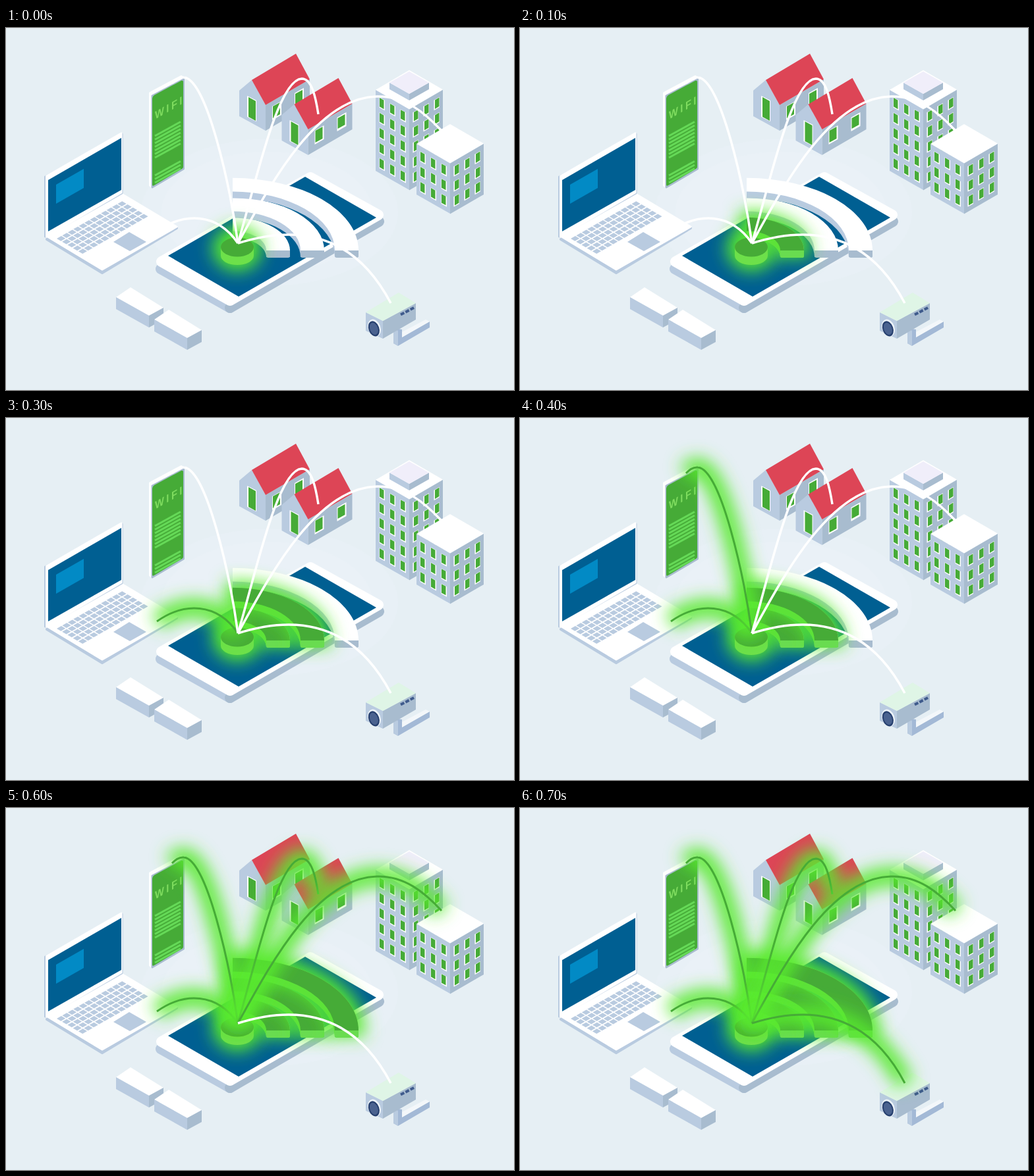
Write an HTML page that moves like this. It is 771 by 550 pixels and loops after 0.8 s.

```html
<!DOCTYPE html>
<html lang="en">
<head>
<meta charset="utf-8">
<title>Connected devices</title>
<style>
html, body { margin: 0; width: 100%; height: 100%; overflow: hidden; background: #e6eff4; }
svg { display: block; width: 771px; height: 550px; }
.w { fill: #fff; }
.l { fill: #b9cbe0; }
.r { fill: #a8bccf; }
.g { fill: #46ab37; }
.blue { fill: #005f92; }
.red { fill: #dd4556; }
.stripe { stroke: #65d957; stroke-width: 3; }
.glow { fill: #58ea2e; stroke: #58ea2e; filter: url(#blur); }
.link { fill: none; stroke: #fff; stroke-width: 3.5; }
.link.glow { stroke: #58ea2e; stroke-width: 28; }
.link.on { stroke: #46ab37; stroke-width: 3; }
text { font: bold 17px "Liberation Sans", Arial, sans-serif; letter-spacing: 4px; fill: #7fdc5f; }
</style>
</head>
<body>
<svg viewBox="0 0 771 550">
  <defs>
    <filter id="blur" filterUnits="userSpaceOnUse" x="0" y="0" width="771" height="550">
      <feGaussianBlur stdDeviation="13"/>
    </filter>
    <g id="house">
      <path class="l" d="M354 95 373 79 394 117V156L354 134Z"/>
      <path class="r" d="M394 117 461 78V117L394 156Z"/>
      <path class="red" d="M373 79 440 39 461 78 394 117Z"/>
      <path class="w" d="M366 103 380 110V142L366 135Z"/>
      <path class="g" d="M368 105 379 111V141L368 135Z"/>
      <path class="w" d="M404 119 418 111V132L404 140Z"/>
      <path class="g" d="M405 119 416 113V131L405 137Z"/>
      <path class="w" d="M438 99 452 91V112L438 120Z"/>
      <path class="g" d="M439 100 450 94V110L439 116Z"/>
    </g>
    <g id="block">
      <path class="w" d="M167 409 189 394 239 425 217 437Z"/>
      <path class="l" d="M167 409 217 437V455L167 427Z"/>
      <path class="r" d="M217 437 239 425V443L217 455Z"/>
    </g>
  </defs>

  <ellipse cx="400" cy="280" rx="195" ry="112" fill="#e8f0f6"/>
  <ellipse cx="396" cy="280" rx="160" ry="92" fill="#eaf1f7"/>

  <!-- laptop -->
  <g stroke-linejoin="round">
    <path class="l" stroke="#b9cbe0" stroke-width="4" d="M62 321 177 255 259 304 146 372Z"/>
    <path class="w" stroke="#fff" stroke-width="3" d="M63 317 177 253 259 302 146 367Z"/>
    <path class="l" stroke="#b9cbe0" stroke-width="3" d="M59.500 226 176 161V251L59.500 317Z"/>
    <path class="w" stroke="#fff" stroke-width="3" d="M61.500 225 175 160V250L61.500 317Z"/>
  </g>
  <path class="blue" d="M64 231 175 167V246L64 309Z"/>
  <path fill="#028ac5" d="M76 238 118 214V243L76 267Z"/>
  <g id="keys" class="l" transform="matrix(8.4 -4.8 8.2 4.8 77 320)"/>
  <path class="l" d="M163 325 187 310 213 325 188 339Z"/>

  <!-- upright phone -->
  <g stroke-linejoin="round">
    <path class="w" stroke="#fff" stroke-width="4" d="M219 99 266 74 269 77V213L222 241 219 239Z"/>
    <path class="r" stroke="#a8bccf" stroke-width="3" d="M222 103 269.500 78V214L222 242Z"/>
  </g>
  <path class="g" d="M222 107Q222 104 225 102L266 80Q269 79 269 82V211Q269 213 267 214L225 239Q222 241 222 238Z"/>
  <text transform="matrix(.866 -.5 0 1 226 139)">WIFI</text>
  <g id="stripes"></g>

  <use href="#house"/>
  <use href="#house" x="64.5" y="37"/>
  <g id="towers"></g>
  <use href="#block"/>
  <use href="#block" x="58" y="34"/>

  <!-- camera -->
  <path fill="#a3b9d6" d="M588 456 601 458V470L643 446V455L595 483 588 479Z"/>
  <path class="l" d="M588 456 595 460V483L588 479Z"/>
  <path class="w" d="M601 462 637 443 643 446 601 470Z" opacity=".55"/>
  <path class="r" d="M572 445 622 418V443L572 472Z"/>
  <path class="l" d="M546 432 572 445V472L546 460Z"/>
  <path fill="#dff5e6" d="M546 432 596 402 622 418 572 445Z"/>
  <g transform="rotate(-20 558 456)">
    <ellipse cx="559" cy="456" rx="9.500" ry="13.500" fill="#edf3f8"/>
    <ellipse cx="558" cy="457" rx="8" ry="12" fill="#27406f"/>
    <ellipse cx="558" cy="457" rx="6" ry="9.500" fill="#4a628f"/>
  </g>
  <path stroke="#3f5b8c" stroke-width="4" stroke-dasharray="6 2.3" d="M599 435.500 621 424"/>

  <!-- flat phone -->
  <g stroke-linejoin="round" stroke-width="16">
    <path class="l" stroke="#b9cbe0" d="M235 366 340 425 462 238Z"/>
    <path class="r" stroke="#a8bccf" d="M340 425 566 294 462 238Z"/>
    <path class="w" stroke="#fff" d="M236 355 340 414 565 284 462 227Z"/>
  </g>
  <path class="blue" d="M246 346 353 408 562 288 454 226Z"/>

  <g id="signal"></g>
</svg>
<script>
const byId = id => document.getElementById(id);
const rect = (x, y, w, h, cls) =>
  `<rect x="${x}" y="${y}" width="${w}" height="${h}" class="${cls}"/>`;

let keys = '';
for (let v = 0; v < 5; v++)
  for (let u = 0; u < 12; u++) keys += rect(u, v, .82, .78, '');
byId('keys').innerHTML = keys;

let stripes = '';
for (const y of [164, 169.5, 175, 180.5, 186, 191.5, 197, 224, 229.5, 235])
  stripes += `<path class="stripe" d="M226 ${y}L265 ${y - 21.5}"/>`;
byId('stripes').innerHTML = stripes;

// Isometric tower with its left roof corner at (x, y)
function tower(x, y, height, rows) {
  const face = (dx, dy, slope, cls, inset) => {
    let s = `<g transform="matrix(1 ${slope} 0 1 ${x + dx} ${y + dy})">` +
      rect(0, 0, 51, height, cls);
    for (let j = 0; j < rows; j++)
      for (let i = 0; i < 3; i++) {
        const wx = 5.5 + 16 * i, wy = 8 + 23 * j;
        s += rect(wx, wy, 8.5, 15.5, 'w') + rect(wx + inset, wy + .5, 6.5, 13.5, 'g');
      }
    return s + '</g>';
  };
  return face(0, 0, .57, 'l', .5) + face(51, 29.5, -.58, 'r', 1.5) +
    `<path class="w" d="M${x} ${y}l51 -30 51 29.5 -51 30Z"/>`;
}
byId('towers').innerHTML = tower(561, 94, 123, 5) +
  `<path class="l" d="M582 83 612 100V110L582 93Z"/>
   <path class="r" d="M612 100 642 83V93L612 110Z"/>
   <path fill="#f0eefa" d="M582 83 612 66 642 83 612 100Z"/>` +
  tower(623, 176, 77, 3);

// Quarter rings of the signal: outer radius, inner radius, step that lights it
const rings = [[87, 51, 1], [139, 103, 3], [191, 155, 5]];
const ringPath = ([a, b]) => {
  const ay = a * .577, by = b * .577;
  return `M344 ${338 - ay}A${a} ${ay} 0 0 1 ${344 + a} 338H${344 + b}` +
    `A${b} ${by} 0 0 0 344 ${338 - by}Z`;
};
function ring(r, top, wall, end) {
  const [a, b] = r, d = ringPath(r);
  return `<path d="${d}" transform="translate(0 10)" fill="${wall}"/>
    <path d="M${344 + b} 337h${a - b}v9q0 3-3 3h${6 + b - a}q-3 0-3-3Z" fill="${end}"/>
    <path d="${d}" fill="${top}"/>`;
}
const litRing = r => `<g data-on="${r[2]}">
  <path class="glow" stroke-width="20" d="${ringPath(r)}"/>
  ${ring(r, '#46ab37', '#5ce238', '#69dc50')}</g>`;

const links = [
  { on: 2, d: 'M352 327C320 280 270 280 229 309' },
  { on: 4, d: 'M352 327C340 240 305 78 270 75C262 74 256 80 252 84' },
  { on: 5, d: 'M352 327C378 240 412 78 449 77C464 77 470 105 474 131' },
  { on: 6, d: 'M352 327C400 240 470 106 563 104C605 103 635 128 661 156' },
  { on: 7, d: 'M352 327C447 297 530 315 584 418' }
];
const line = (k, cls) => `<path class="link ${cls}" d="${k.d}"/>`;
const litLink = k => `<g data-on="${k.on}">${line(k, 'glow')}${line(k, 'on')}</g>`;
const idleLink = k => `<g data-off="${k.on}">${line(k, '')}</g>`;

byId('signal').innerHTML =
  rings.map(r => ring(r, '#fff', '#b9cbe0', '#a8bccf')).join('') +
  '<ellipse class="glow" cx="351" cy="335" rx="37" ry="34"/>' +
  rings.map(litRing).join('') +
  `<path fill="#6de04a" d="M326 333V346A25 14 0 0 0 376 346V333Z"/>
   <ellipse class="g" cx="351" cy="333" rx="25" ry="14.5"/>` +
  links.map(litLink).join('') + links.map(idleLink).join('');

const parts = [...document.querySelectorAll('[data-on], [data-off]')];
const start = performance.now();

function tick() {
  const step = Math.floor((performance.now() - start) / 100) % 8;
  for (const { dataset: { on = 0, off = 8 }, style } of parts)
    style.display = step >= on && step < off ? '' : 'none';
  requestAnimationFrame(tick);
}
tick();
</script>
</body>
</html>
```
